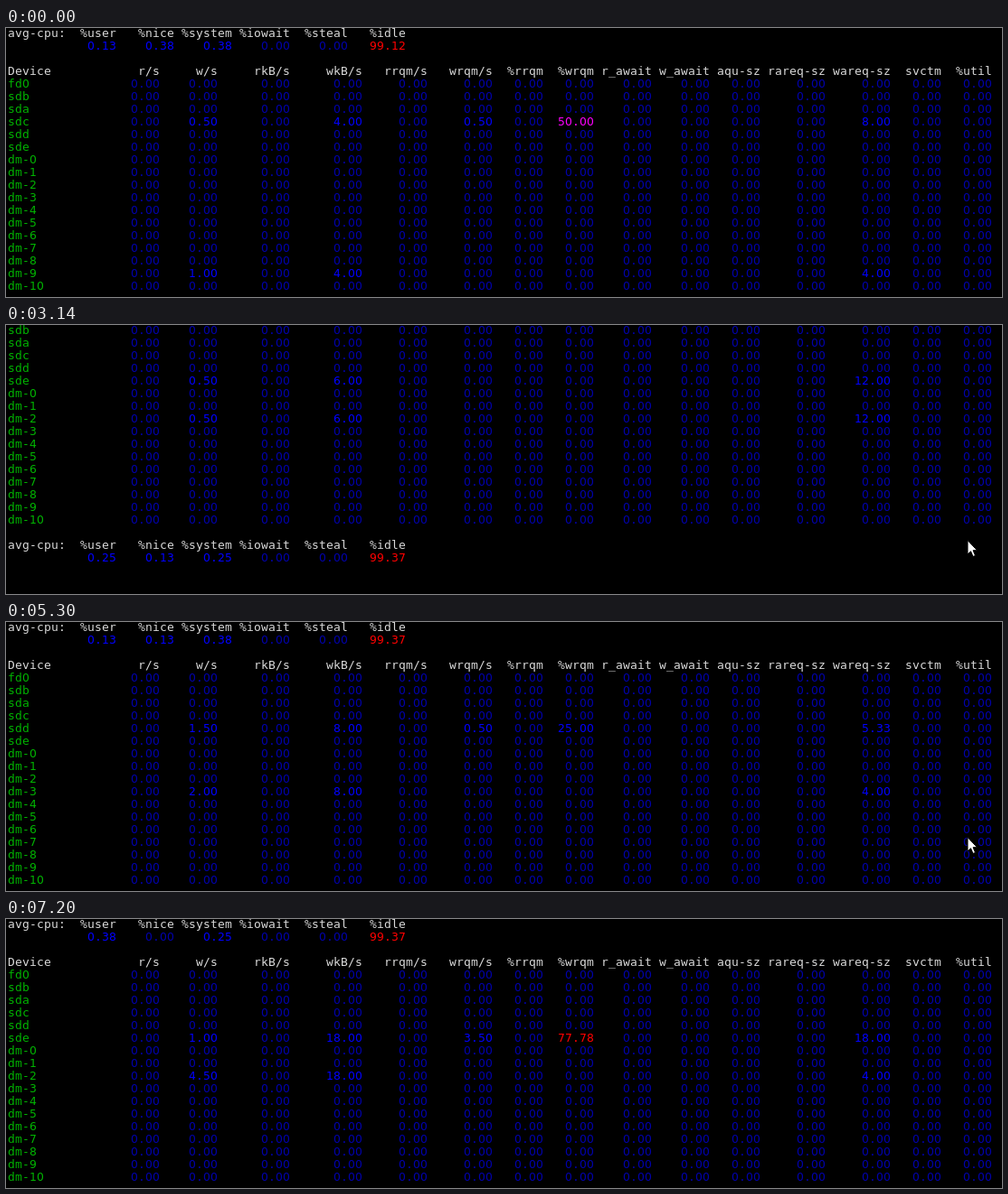
These frames come from a looping animation (1101x298 px, 8040 ms). An HTML page with a canvas:

```html
<!DOCTYPE html>
<html lang="en">
<head>
<meta charset="utf-8">
<title>Disk statistics</title>
<style>
  html, body { margin: 0; width: 100%; height: 100%; overflow: hidden; background: #000; }
  canvas { display: block; }
</style>
</head>
<body>
<canvas id="stage" width="1101" height="298"></canvas>
<script>
const ctx = document.getElementById('stage').getContext('2d');
const LOOP = 8040, CELL = 8, LINE = 14, LEFT = 2, BASE = 10;
const GREY = '#dadada', GREEN = '#00b400';

// The spacing of the headings sets the right edge of each column
const cpuHead = 'avg-cpu:  %user   %nice %system %iowait  %steal   %idle';
const diskHead = 'Device            r/s     w/s     rkB/s     wkB/s   rrqm/s   wrqm/s' +
  '  %rrqm  %wrqm r_await w_await aqu-sz rareq-sz wareq-sz  svctm  %util';
const devices = ['fd0', 'sdb', 'sda', 'sdc', 'sdd', 'sde',
  ...Array.from({ length: 11 }, (_, i) => 'dm-' + i)];

// CPU ticks for user, nice and system; then the one disk written to and its volume
const reports = [
  { ticks: [1, 3, 3], disk: 'sdc', volume: 'dm-9', writes: 0.5, merged: 0.5, kB: 4 },
  { ticks: [1, 10, 2], disk: 'sde', volume: 'dm-2', writes: 0.5, merged: 0, kB: 6 },
  { ticks: [2, 1, 2], disk: 'sdc', volume: 'dm-9', writes: 1.5, merged: 2, kB: 14 },
  { ticks: [1, 1, 3], disk: 'sdd', volume: 'dm-3', writes: 1.5, merged: 0.5, kB: 8 },
  { ticks: [3, 0, 2], disk: 'sde', volume: 'dm-2', writes: 1, merged: 3.5, kB: 18 }
].map(layout);

function shade(n) {
  return n >= 75 ? '#ff0000' : n >= 50 ? '#ff00ff' : n > 0 ? '#0000ff' : '#0000ac';
}

function words(line, color) {
  return [...line.matchAll(/\S+/g)].map(([text, ...rest], i, all) =>
    ({ text, color, end: line.indexOf(text) + text.length }));
}

// Values are keyed by column heading; missing ones are zero
function numbers(head, values) {
  return words(head).slice(1).map(({ text, end }) => {
    const n = values[text] || 0;
    return { text: n.toFixed(2), end, color: shade(n) };
  });
}

function writeStats(writes, merged, kB) {
  return {
    'w/s': writes, 'wkB/s': kB, 'wrqm/s': merged,
    '%wrqm': 100 * merged / (writes + merged), 'wareq-sz': kB / writes
  };
}

// A report becomes lines of { text, end, color }
function layout({ ticks, disk, volume, writes, merged, kB }) {
  const [user, nice, system] = ticks.map(n => n * 0.126);
  const busy = {
    [disk]: writeStats(writes, merged, kB),
    [volume]: writeStats(writes + merged, 0, kB)
  };
  return [
    words(cpuHead, GREY),
    numbers(cpuHead, {
      '%user': user, '%nice': nice, '%system': system, '%idle': 100 - user - nice - system
    }),
    [],
    words(diskHead, GREY),
    ...devices.map(name => [...words(name, GREEN), ...numbers(diskHead, busy[name] || {})]),
    []
  ];
}

function drawText({ text, end, color }, y) {
  ctx.fillStyle = color;
  [...text].forEach((ch, i) => {
    // Proportional digits have a plain zero
    ctx.font = /\d/.test(ch) ? '12.35px "DejaVu Sans", sans-serif'
                             : '13px "DejaVu Sans Mono", monospace';
    ctx.fillText(ch, LEFT + (end - text.length + i + 0.5) * CELL, y);
  });
}

function drawLog(lines, { shift = 0, count = lines.length, lastEnd = Infinity }) {
  lines.slice(shift, count).forEach((line, i) => {
    const isLast = shift + i === count - 1;
    for (const item of line)
      if (!isLast || item.end <= lastEnd) drawText(item, BASE + i * LINE);
  });
}

// Each new report first shows half printed for a moment
const SCROLL = 80;
const headOnly = { shift: 5, count: 24 };
const scrolls = [
  { time: 1300, shift: 12, count: 34 },
  { time: 3140, ...headOnly },
  { time: 5220, shift: 21, count: 28, lastEnd: 113 },
  { time: 7120, ...headOnly }
];

function drawScreen(t) {
  const index = scrolls.filter(s => t >= s.time + SCROLL).length;
  const next = scrolls[index];
  if (next && t >= next.time) drawLog([...reports[index], ...reports[index + 1]], next);
  else drawLog(reports[index], {});
}

// The pointer comes in from below, rests, then sweeps out to the lower left
const ENTER = 540, SETTLE = 1070, LEAVE = 5990, GONE = 6280, STEP = 74;

function pointerAt(t) {
  if (t < ENTER || t >= GONE) return null;
  if (t < SETTLE) {
    const u = Math.min(1, Math.floor((t - ENTER) / STEP) / 2);
    return [1040 + 17.5 * u, 239 + 43 * (1 - u) ** 1.5];
  }
  const u = t < LEAVE ? 0 : Math.floor((t - LEAVE) / STEP + 1) / 4;
  return [1062.5 - 194.5 * u ** 1.7, 238 + 53 * u];
}

const arrow = new Path2D('M.5 .5V16L4 12.7 6.5 18.5 9 17.4 6.5 11.7H11Z');

function drawPointer(x, y) {
  ctx.save();
  ctx.translate(x, y);
  ctx.fillStyle = '#fff';
  ctx.strokeStyle = '#000';
  ctx.fill(arrow);
  ctx.stroke(arrow);
  ctx.restore();
}

function render(t) {
  ctx.fillStyle = '#000';
  ctx.fillRect(0, 0, 1101, 298);
  ctx.textAlign = 'center';
  drawScreen(t);
  const tip = pointerAt(t);
  if (tip) drawPointer(...tip);
}

const start = performance.now();
function tick() {
  render((performance.now() - start) % LOOP);
  requestAnimationFrame(tick);
}
tick();
</script>
</body>
</html>
```
